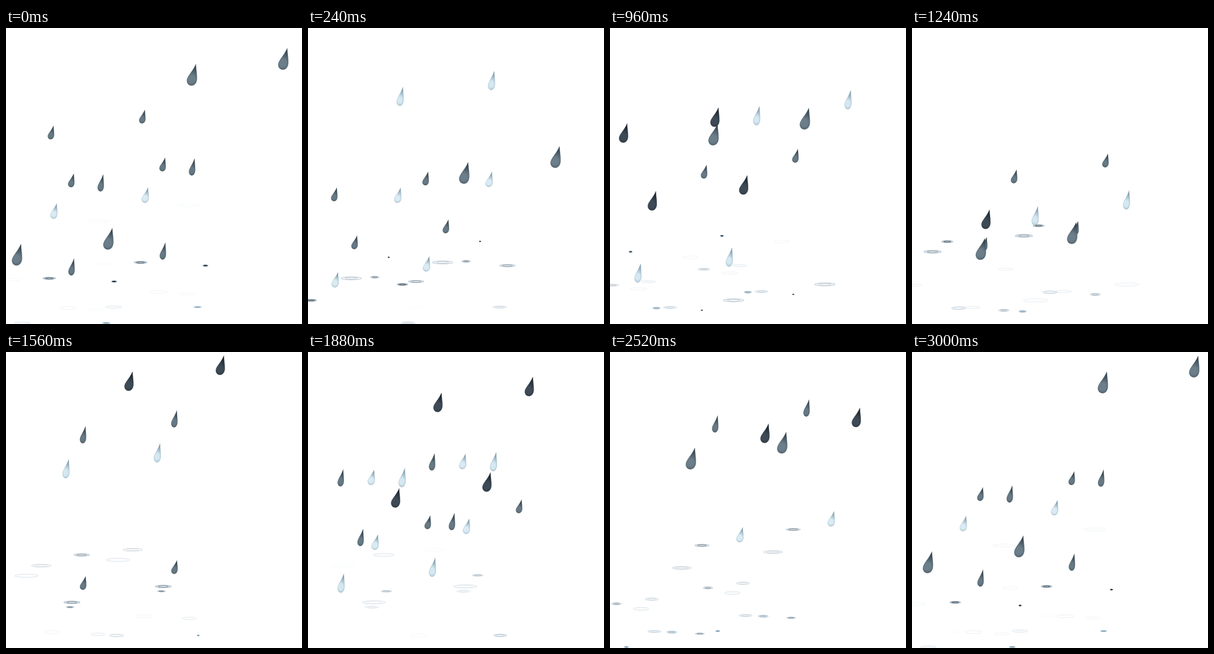
These frames come from a looping animation (512x512 px, 3.04 s). An HTML page with a canvas:

```html
<!DOCTYPE html>
<html>
<head>
<meta charset="utf-8">
<style>
html, body { margin: 0; width: 100%; height: 100%; overflow: hidden; background: #fff; }
canvas { display: block; width: 512px; height: 512px; }
</style>
</head>
<body>
<canvas id="stage" width="512" height="512"></canvas>
<script>
const ctx = document.getElementById('stage').getContext('2d');
const STEP = 40, STEPS = 76, FALL = 14, FADE = 23;
const SPEED = { x: -7.65, y: 25.25 };
const REST = { x: -3, y: -20 };
const RING = 42;

// Each shower is five drops: [delay in steps, x, y of the splash].
const showerA = [[0, 0, 0], [5, -88, 9], [25, 63, 4], [30, 98, -35], [48, 126, 69]];
const showerB = [[0, 0, 0], [39, -35, 0], [46, -97, 34], [57, 89, 34], [67, -70, -41]];

// The same showers recur at other sizes, places, times and shades.
const layers = [
  { shower: showerA, x: 219, y: 342, sx: 1, sy: 1, start: 12, edge: '#18222b', core: '#3e4b56' },
  { shower: showerA, x: 230, y: 400, sx: .69, sy: .88, start: 37, edge: '#2b3a45', core: '#667984' },
  { shower: showerA, x: 224.5, y: 411, sx: .705, sy: .707, start: 71, edge: '#2b3a45', core: '#667984' },
  { shower: showerB, x: 272, y: 405.5, sx: 1.12, sy: 1.12, start: 18, edge: '#32414c', core: '#6b7e8a' },
  { shower: showerB, x: 262, y: 456, sx: .78, sy: .785, start: 1, edge: '#7897a9', core: '#daebf3' },
  { shower: showerB, x: 265, y: 457, sx: .76, sy: .98, start: 43, edge: '#7897a9', core: '#d5e8f1' }
];
const copies = [[0, 0], [-158, 27.5]];

function drawDrop({ edge, core }, x, y) {
  ctx.save();
  ctx.translate(x, y);
  const fill = ctx.createRadialGradient(-1.5, 7, 0, 0, 5, 18);
  fill.addColorStop(0, core);
  fill.addColorStop(.3, core);
  fill.addColorStop(1, edge);
  ctx.fillStyle = fill;
  ctx.beginPath();
  ctx.moveTo(6, -16.5);
  ctx.bezierCurveTo(6.2, -8, 7.8, -2, 7.6, 6);
  ctx.bezierCurveTo(7.4, 12, 4, 16.5, -.5, 16.5);
  ctx.bezierCurveTo(-5, 16.5, -7.8, 13, -7.8, 9);
  ctx.bezierCurveTo(-7.8, 2, 1, -4, 6, -16.5);
  ctx.fill();
  ctx.strokeStyle = edge;
  ctx.globalAlpha = .35;
  ctx.lineWidth = 1;
  ctx.stroke();
  ctx.restore();
}

function drawRing(x, y, width, color, alpha) {
  if (alpha <= 0) return;
  ctx.globalAlpha = alpha;
  ctx.strokeStyle = color;
  ctx.beginPath();
  ctx.ellipse(x, y, width / 2, width * .06 + .3, 0, 0, 7);
  ctx.stroke();
}

// The ring spreads quickly, then slows as it fades.
function drawRipple({ edge }, x, y, age) {
  const width = RING * (1 - Math.exp(-age / 7.5));
  const alpha = (1 - age / FADE) ** 1.3;
  ctx.lineWidth = 1.5;
  drawRing(x, y, width - 1, '#7d9cb3', alpha * .8);
  drawRing(x, y, width * .6, edge, alpha * (1 - age / 17));
  ctx.globalAlpha = 1;
}

function drawLayer(layer, step) {
  for (const [delay, x, y] of layer.shower) {
    const age = (step - layer.start - delay + 2 * STEPS) % STEPS - FALL;
    if (age <= 0) drawDrop(layer, x + REST.x + SPEED.x * age, y + REST.y + SPEED.y * age);
    else if (age < FADE) drawRipple(layer, x, y, age);
  }
}

function draw(step) {
  ctx.clearRect(0, 0, 512, 512);
  for (const layer of layers)
    for (const [dx, dy] of copies) {
      ctx.save();
      ctx.lineJoin = 'round';
      ctx.translate(layer.x + dx, layer.y + dy);
      ctx.scale(layer.sx, layer.sy);
      drawLayer(layer, step);
      ctx.restore();
    }
}

const begin = performance.now();
function tick() {
  draw(Math.floor((performance.now() - begin) / STEP) % STEPS);
  requestAnimationFrame(tick);
}
tick();
</script>
</body>
</html>
```
